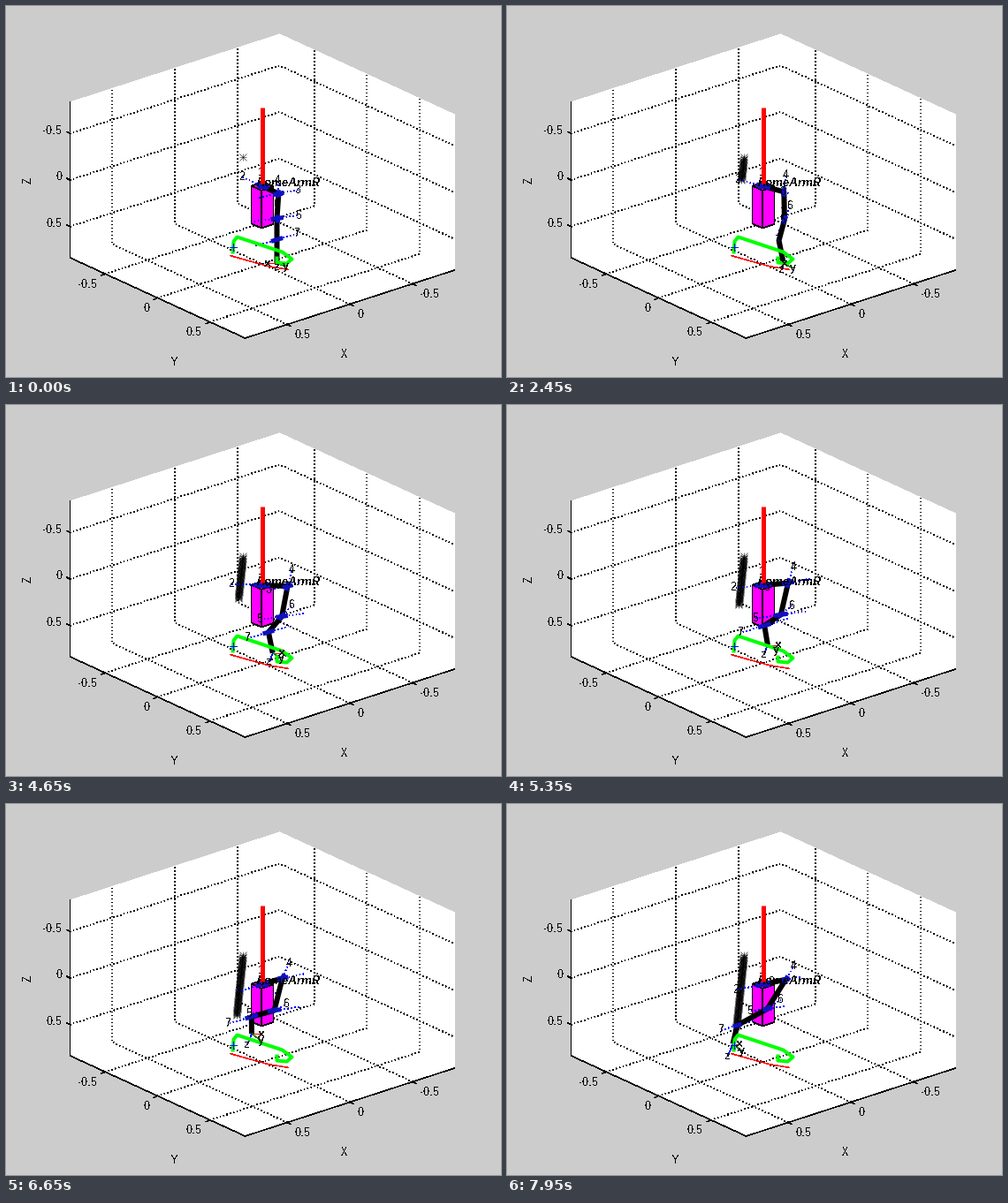
A matplotlib script that plays this animation: 560 by 420 pixels, repeating every 8000 ms.

```python
import numpy as np
import matplotlib
import matplotlib.pyplot as plt
from matplotlib.animation import FuncAnimation

W, H, DPI = 560, 420, 100
PX = 72 / DPI  # points per pixel
HAIR = 0.5 * PX  # fills a single pixel when not antialiased
DOTTED = (0, (1, 7))
INTERVAL, FRAMES, STEPS = 50, 160, 80
LIM = 0.835
TICKS = (-0.5, 0, 0.5)
BLUE = "#1010c0"

matplotlib.rcParams.update({
    "font.family": "Liberation Sans",
    "font.size": 13 * PX,
    "text.antialiased": False,
    "text.hinting": "native",
    "text.hinting_factor": 1,
    "text.kerning_factor": 6,
    "patch.antialiased": False,
    "lines.dash_capstyle": "butt",
    "lines.solid_capstyle": "butt",
})

fig = plt.figure(figsize=(W / DPI, H / DPI), dpi=DPI, facecolor="#cccccc")
ax = fig.add_axes([0, 0, 1, 1])
ax.set_xlim(-0.5, W - 0.5)
ax.set_ylim(H - 0.5, -0.5)
ax.axis("off")


def project(x, y, z):
    return np.array([289.5 - 141.9 * x + 118.6 * y,
                     203.5 + 46.1 * x + 54.5 * y + 105.4 * z])


def line(points, color="k", width=1, z=1, **style):
    xs, ys = zip(*points) if len(points) else ((), ())
    thick = width > 1
    return ax.plot(xs, ys, color=color, lw=width * PX if thick else HAIR,
                   antialiased=thick, zorder=z, **style)[0]


def label(x, y, text, z=1, ha="center", **style):
    return ax.text(x, y, text, ha=ha, va="center", zorder=z, **style)


def face(corners, color, edge="none", z=0):
    ax.add_patch(plt.Polygon([project(*c) for c in corners], fc=color, ec=edge,
                             lw=HAIR, zorder=z))


def draw_axes():
    a = LIM
    face([(-a, -a, -a), (a, -a, -a), (a, -a, a), (-a, -a, a)], "w")
    face([(-a, -a, -a), (-a, a, -a), (-a, a, a), (-a, -a, a)], "w")
    face([(-a, -a, a), (a, -a, a), (a, a, a), (-a, a, a)], "w")

    def tick(value, corners, mark, offset, ha):
        path = [project(*c) for c in corners]
        line(path, ls=DOTTED)
        line([path[0], path[0] + mark])
        label(*(path[0] + offset), f"{value:g}", ha=ha)

    for t in TICKS:
        tick(t, [(t, a, a), (t, -a, a), (t, -a, -a)], (4, 2), (8, 12), "left")
        tick(t, [(a, t, a), (-a, t, a), (-a, t, -a)], (-5, 2), (-9, 12), "right")
        tick(t, [(a, -a, t), (-a, -a, t), (-a, a, t)], (-4, -2), (-9, -3), "right")
    line([project(*c) for c in ((a, -a, -a), (a, -a, a), (a, a, a), (-a, a, a))])
    label(382, 394, "X")
    label(190, 403, "Y")
    label(25, 197, "Z", rotation=90)


def draw_scene():
    s, h = 0.048, 0.405
    face([(s, -s, 0), (s, s, 0), (-s, s, 0), (-s, -s, 0)], "#ff00ff", "k", 3)
    face([(s, -s, 0), (s, s, 0), (s, s, h), (s, -s, h)], "#ff00ff", "k", 3)
    face([(-s, s, 0), (s, s, 0), (s, s, h), (-s, s, h)], "#ff00ff", "k", 3)
    line([(283, 204), (296, 204)], BLUE, 5, 6)
    label(288, 188, "1", 7)
    label(319, 200, "HomeArmR", 7, weight="bold", style="italic")
    line([(289, 115), (289, 201)], "r", 5, 8)
    line([(256, 280), (257, 266), (261, 261), (312, 278), (323, 286), (317, 291),
          (306, 290), (306, 283)], "#00ff00", 4, 9, solid_joinstyle="round")
    line([(253, 282), (274, 288), (296, 294), (319, 298)], "r", 1, 9)
    line([(252, 273), (260, 273)], "b", 1, 9)
    line([(256, 269), (256, 277)], "b", 1, 9)


def pose(step):
    """Arm joints, joint-axis offsets and tripod offsets, all in pixels."""
    u = step / STEPS
    bow = 4 * u * (1 - u)
    lift = np.exp(-((u - 0.84) / 0.25) ** 2)
    yaw = np.radians(45 * u + 50 * lift)
    roll = np.cos(np.radians(30 + 200 * u))

    base = project(0, 0, 0)
    shoulder = project(-0.155 * np.sin(yaw), 0.155 * np.cos(yaw), 0)
    elbow = np.array([306 - 12 * u + 13 * bow, 240 - 6 * u + 4 * bow - 4 * lift])
    wrist = np.array([306 - 46 * u + 18 * bow, 264 + 4 * u - 27 * lift])
    hand = np.array([306 - 51 * u + 26 * bow, 291 + 2 * u - 33 * lift])

    axes = {
        "2": (base, 1.2 * (base - shoulder)),
        "3": (shoulder, np.array([25, -5]) * roll),
        "4": (shoulder, np.array([10 * u - 1, -15 - 4 * bow])),
        "5": (elbow, np.array([29, -4]) * roll),
        "6": (elbow, np.array([15 * u + 3 * bow, 9 * lift - 16])),
        "7": (wrist, np.array([27, -8]) * roll),
    }
    tripod = {
        "x": np.array([-12 * roll, 0]),
        "y": np.array([10, 3 + 5 * u]),
        "z": np.array([-6 * u, 4 + 10 * u]),
    }
    return (base, shoulder, elbow, wrist, hand), axes, tripod


draw_axes()
draw_scene()

trail = [line([], z=4, ls="none", marker=m, ms=8 * PX, mew=HAIR) for m in ("+", "x")]
arm = line([], "k", 6, 5, solid_joinstyle="round")
axis_parts = {name: (line([], "b", 1, 4, ls=DOTTED), line([], BLUE, 5, 6),
                     label(0, 0, name, 7 if name == "3" else 10))
              for name in "234567"}
tripod_parts = {name: (line([], color, 1, 6),
                       label(0, 0, name, 10, weight="normal" if name == "z" else "bold"))
                for name, color in zip("xyz", "rgb")}


def set_ends(artist, start, end):
    artist.set_data(*np.array([start, end]).T)


def draw(frame):
    step = (frame + 1) // 2
    k = np.arange(step + 1)
    for marks in trail:
        marks.set_data(267.3 - 0.105 * k, 171 + 1.01 * k)

    joints, axes, tripod = pose(step)
    arm.set_data(*np.array(joints).T)
    for name, (centre, reach) in axes.items():
        dots, cylinder, text = axis_parts[name]
        set_ends(dots, centre - reach, centre + reach)
        set_ends(cylinder, centre - 0.28 * reach, centre + 0.28 * reach)
        text.set_position(centre + reach)

    hand = joints[-1]
    for name, reach in tripod.items():
        ray, text = tripod_parts[name]
        set_ends(ray, hand, hand + reach)
        text.set_position(hand + reach)
    return [*trail, arm]


anim = FuncAnimation(fig, draw, frames=FRAMES, interval=INTERVAL, repeat=True,
                     repeat_delay=0, blit=False)
plt.show()
```
